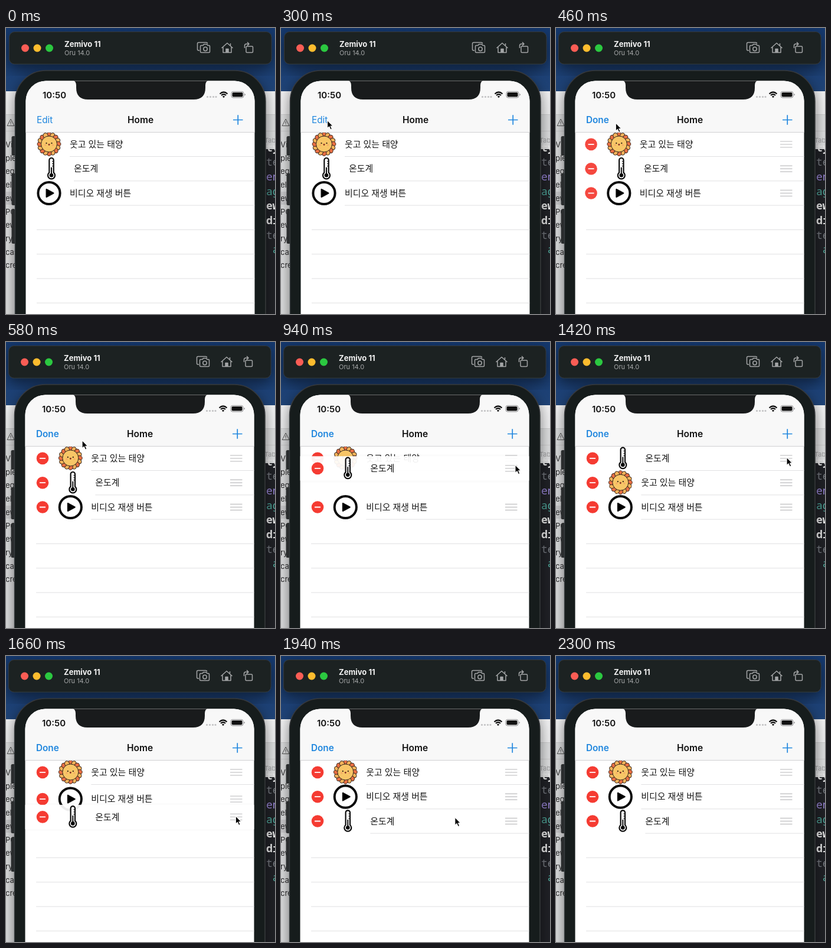
Animation, 456 px wide and 484 px high, one loop 2.52 s. Source, as an HTML page:

```html
<!DOCTYPE html>
<html lang="ko">
<head>
<meta charset="utf-8">
<title>Reorder list</title>
<style>
  html, body { margin: 0; width: 100%; height: 100%; overflow: hidden; }
  svg { display: block; width: 456px; height: 484px; font-family: Inter, Roboto, sans-serif; }
  .ko { font: 14.9px "Noto Sans CJK KR", "Noto Sans CJK", sans-serif; }
  .mono { font: 18px "Noto Sans Mono", monospace; }
  .bold { font-weight: 600; }
  .icon { fill: none; stroke: #a3a5a6; stroke-width: 1.5; stroke-linejoin: round; }
  .sep { stroke: #e0e0e2; }
</style>
</head>
<body>
<svg viewBox="0 0 456 484">
  <defs>
    <linearGradient id="sky" x2="0" y2="1">
      <stop stop-color="#14386e"/><stop offset="1" stop-color="#1f4377"/>
    </linearGradient>
    <clipPath id="screenClip"><rect x="33.500" y="89.500" width="388" height="440" rx="34"/></clipPath>
    <filter id="shadow" x="-15%" y="-15%" width="130%" height="150%">
      <feDropShadow dx="0" dy="8" stdDeviation="12" flood-opacity=".5"/>
    </filter>
    <filter id="lift" x="-5%" y="-30%" width="110%" height="160%">
      <feDropShadow dx="0" dy="0" stdDeviation="3" flood-opacity=".06"/>
    </filter>
  </defs>

  <!-- desktop -->
  <rect width="456" height="108" fill="url(#sky)"/>
  <rect y="107" width="456" height="377" fill="#e0e1e2"/>
  <rect y="107" width="456" height="39" fill="#f1f1f2"/>
  <path d="M0 146.500H456M0 174.500H456" stroke="#cfcfd0"/>
  <path d="M8 154l6 11.500H2zM8 158v4M8 163v1" fill="none" stroke="#555"/>
  <rect y="277" width="30" height="22" fill="#cdcdcf"/>
  <g id="sidebar" font-size="13" fill="#2c2c2e"></g>
  <text x="438" y="194" font-size="11" fill="#a0a0a2">Tab</text>
  <rect x="430" y="205" width="26" height="279" fill="#202126"/>
  <g id="code" class="mono"></g>

  <g id="sim">
    <!-- title bar -->
    <g filter="url(#shadow)">
      <rect x="5.500" y="6.500" width="444.500" height="54.500" rx="9" fill="#1c2122" stroke="#34393a"/>
    </g>
    <circle cx="32.500" cy="34" r="6.500" fill="#fb5d55"/>
    <circle cx="53" cy="34" r="6.500" fill="#fdbc2e"/>
    <circle cx="73.500" cy="34" r="6.500" fill="#2bc840"/>
    <text x="99" y="32" font-size="13" font-weight="700" fill="#f4f4f4">Zemivo 11</text>
    <text x="99" y="46" font-size="11" fill="#a6a8a9">Oru 14.0</text>
    <g class="icon">
      <path d="M328 38h-1.500q-2 0-2-2V26.500q0-2 2-2h13q2 0 2 2"/>
      <path d="M331 29.500h3l1.500-2h5l1.500 2h2q1.500 0 1.500 1.500v9q0 1.500-1.500 1.500h-13q-1.500 0-1.500-1.500v-9q0-1.500 1.500-1.500z"/>
      <circle cx="338" cy="35.500" r="3.200"/>
      <path d="M365.500 34l9.500-8.500 9.500 8.500M368 32.500V41.500h14v-9M380.500 29.500v-3.500"/>
      <path d="M373 41v-5.500h4V41z" fill="#a3a5a6"/>
      <rect x="407" y="31" width="11.500" height="10.500" rx="1.500"/>
      <path d="M404.500 34v-4q0-3 3-3h4M409 24l3 3-3 3"/>
    </g>

    <!-- phone body -->
    <path d="M15 183h-3q-2.500 0-2.500 2.500v28q0 2.500 2.500 2.500h3zM15 246h-3q-2.500 0-2.500 2.500v49q0 2.500 2.500 2.500h3zM15 307h-3q-2.500 0-2.500 2.500v53q0 2.500 2.500 2.500h3z" fill="#35383a"/>
    <g filter="url(#shadow)">
      <rect x="15.500" y="72" width="424.500" height="480" rx="52" fill="#191b1c" stroke="#36393b" stroke-width="1.500"/>
    </g>

    <g clip-path="url(#screenClip)">
      <rect x="33" y="89" width="389" height="395" fill="#fff"/>
      <g id="list"></g>
      <rect x="33" y="89" width="389" height="87.500" fill="#f8f8f8"/>
      <path d="M33 176.500H422" stroke="#d0d0d2"/>
      <path d="M111 88q8 1 8 9v4q0 20 20 20H318q20 0 20-20v-4q0-8 8-9z" fill="#191b1c"/>
      <text x="62" y="118.500" font-size="15" class="bold" fill="#111">10:50</text>
      <g fill="#c2c2c4">
        <circle cx="341.500" cy="116.500" r="1.600"/><circle cx="346.500" cy="116.500" r="1.600"/>
        <circle cx="351.500" cy="116.500" r="1.600"/><circle cx="356" cy="116.500" r="1.600"/>
      </g>
      <path d="M362.500 111.500q6.500-6 13 0M365 114q4-3.500 8 0" fill="none" stroke="#111" stroke-width="2.200"/>
      <path d="M366.800 115.800q2.200-1.600 4.400 0l-2.200 2.400z" fill="#111"/>
      <rect x="382" y="107.500" width="21" height="10.500" rx="3" fill="none" stroke="#8d8d8f"/>
      <rect x="383.500" y="109" width="18" height="7.500" rx="1.700" fill="#111"/>
      <path d="M404.500 111v3.500q1.500-.500 1.500-1.700t-1.500-1.800z" fill="#8d8d8f"/>
      <text id="mode" x="52" y="161" font-size="15.300" fill="#1f86de">Edit</text>
      <text x="228" y="161" font-size="15.500" class="bold" text-anchor="middle" fill="#111">Home</text>
      <path d="M385 155.500h16.500M393.250 147.250v16.500" stroke="#1f86de" stroke-width="1.700"/>
    </g>
  </g>

  <path id="cursor" d="M0 0V13.800l3.200-2.800 2.200 5 2.600-1.100-2.200-4.900H9.800z" fill="#000" stroke="#fff" stroke-width="1.200"/>
</svg>

<script>
const $ = id => document.getElementById(id);
const LOOP = 2520, FIRST = 196.9, PITCH = 41.3;
const rowY = slot => FIRST + PITCH * slot;

// Static text behind the phone
$('sidebar').innerHTML = ['Vi', 'ple', 'ega', 'ele', 'ew(', 'PC', 'ew', 'ry', 'cas', 'cre']
  .map((s, i) => `<text x="-1" y="${202 + 22.7 * i}">${s}</text>`).join('');
$('code').innerHTML = [
  ['ty', '#eee'], ['te', '#777b82'], ['en', '#9a86d8'], ['ag', '#4fa99c'],
  ['ew', '#eee'], ['di', '#eee'], ['te', '#777b82'], [' a', '#4fa99c']
].map(([s, c], i) => `<text x="441" y="${208.5 + 24.7 * i}" fill="${c}" xml:space="preserve"
  font-weight="${c === '#eee' ? 700 : 400}">${s}</text>`).join('');

// Icons, drawn around the row's vertical centre
function sunIcon() {
  let petals = '';
  for (let i = 0; i < 16; i++) {
    petals += `<path d="M-4 -13L-3.800 -17.500Q0 -22.500 3.800 -17.500L4 -13z" transform="rotate(${i * 360 / 16})"
      fill="${i % 2 ? '#f6b45a' : '#ea6f43'}"/>`;
  }
  return `<g transform="translate(73 -.5)" stroke="#3b2a20">${petals}
    <circle r="13.500" fill="#f8c667"/>
    <g stroke="none"><circle cx="-4.500" cy="-1.500" r="1.100" fill="#2b1d14"/><circle cx="4.500" cy="-1.500" r="1.100" fill="#2b1d14"/>
    <circle cx="-6.500" cy="1.500" r="1.500" fill="#f3a868"/><circle cx="6.500" cy="1.500" r="1.500" fill="#f3a868"/>
    <path d="M-1.500 -.500h3q0 3-1.500 3t-1.500-3z" fill="#8a3426"/></g></g>`;
}
const thermometerIcon = `<g transform="translate(77 -.5)">
  <path d="M-3.700 7V-14a3.700 3.700 0 0 1 7.400 0V7a6 6 0 1 1-7.400 0z" fill="#fff" stroke="#0c0c0c" stroke-width="2.200"/>
  <circle cy="11.500" r="3.300"/><path d="M0 11V-2" stroke="#0c0c0c" stroke-width="2"/>
  <path d="M1 -12h3M1 -8h3M1 -4h3" stroke="#0c0c0c"/></g>`;
const playIcon = `<circle cx="73" r="18.600" fill="none" stroke="#0a0a0a" stroke-width="4"/>
  <path d="M68.500 -6.500v13L80.500 0z" stroke="#0a0a0a" stroke-width="2" stroke-linejoin="round"/>`;

function makeRow(id, icon, label, x) {
  return `<g id="${id}">
    <rect class="back" x="33" y="-20.600" width="389" height="41.300" fill="#fff" opacity="0" filter="url(#lift)"/>
    <g class="content">
      <path class="sep" d="M${x} 20.600H422"/>${icon}
      <text class="ko" x="${x}" y="5.100" fill="#161616">${label}</text>
    </g>
    <g class="remove"><circle r="10.300" fill="#f53b32"/><path d="M-5 0H5" stroke="#fff" stroke-width="1.800"/></g>
    <path class="handle" d="M381 -5h20.500M381 0h20.500M381 5h20.500" stroke="#c6c6c8" stroke-width="1.400"/>
  </g>`;
}
let blank = '';
for (let i = 3; i < 7; i++) blank += `<path class="sep" d="M52 ${rowY(i) + 20.6}H422"/>`;
$('list').innerHTML = blank
  + makeRow('sun', sunIcon(), '웃고 있는 태양', 108)
  + makeRow('play', playIcon, '비디오 재생 버튼', 108)
  + makeRow('thermo', thermometerIcon, '온도계', 115);

// Value of a keyed track at time t
const linear = p => p, smooth = p => p * p * (3 - 2 * p);
function track(t, keys, ease = linear) {
  const i = keys.findIndex(k => k[0] > t);
  if (i === 0) return keys[0][1];
  if (i < 0) return keys[keys.length - 1][1];
  const [t0, a] = keys[i - 1], [t1, b] = keys[i];
  return a + (b - a) * ease((t - t0) / (t1 - t0));
}

const cursorX = [[100, 150], [280, 78.5], [360, 78.5], [580, 128], [840, 397], [940, 397], [1120, 391],
  [1420, 391], [1700, 389], [1780, 389], [1940, 295], [2240, 235]];
const cursorY = [[100, 500], [280, 156], [360, 156], [580, 166], [840, 232], [940, 208], [1060, 190],
  [1200, 195], [1440, 195], [1680, 277], [1780, 277], [1940, 272], [2240, 500]];
const sunSlot = [[960, 0], [1060, 1], [1500, 1], [1600, 0]];
const playSlot = [[1580, 2], [1680, 1]];
const dragOpacity = [[820, 0], [860, .93], [1080, .93], [1130, 0], [1440, 0], [1480, .93], [1700, .93], [1750, 0]];

function placeRow(id, y, edit, drag) {
  const row = $(id), part = name => row.querySelector('.' + name);
  row.setAttribute('transform', `translate(0 ${y})`);
  part('content').setAttribute('transform', `translate(${37.3 * edit} 0)`);
  part('remove').setAttribute('transform', `translate(${26 + 37 * edit} 0)`);
  part('remove').setAttribute('opacity', edit);
  part('handle').setAttribute('opacity', edit);
  part('back').setAttribute('opacity', drag);
  part('sep').setAttribute('opacity', drag ? 0 : 1);
}

function thermoY(t, y) {
  if (t < 840) return rowY(1);
  if (t < 1080) return y + 6;
  if (t < 1440) return rowY(0);
  if (t < 1720) return y + 1.9;
  return rowY(2);
}

function draw() {
  const t = performance.now() % LOOP;
  const x = track(t, cursorX), y = track(t, cursorY);
  const editing = t >= 360, edit = track(t, [[360, 0], [480, 1]], smooth);
  $('sim').setAttribute('transform', `translate(${editing ? -1 : 0} 0)`);
  $('mode').textContent = editing ? 'Done' : 'Edit';
  $('mode').setAttribute('font-weight', editing ? 600 : 400);
  placeRow('sun', rowY(track(t, sunSlot, smooth)), edit, 0);
  placeRow('play', rowY(track(t, playSlot, smooth)), edit, 0);
  placeRow('thermo', thermoY(t, y), edit, track(t, dragOpacity));
  $('cursor').setAttribute('transform', `translate(${x} ${y})`);
  requestAnimationFrame(draw);
}
draw();
</script>
</body>
</html>
```
